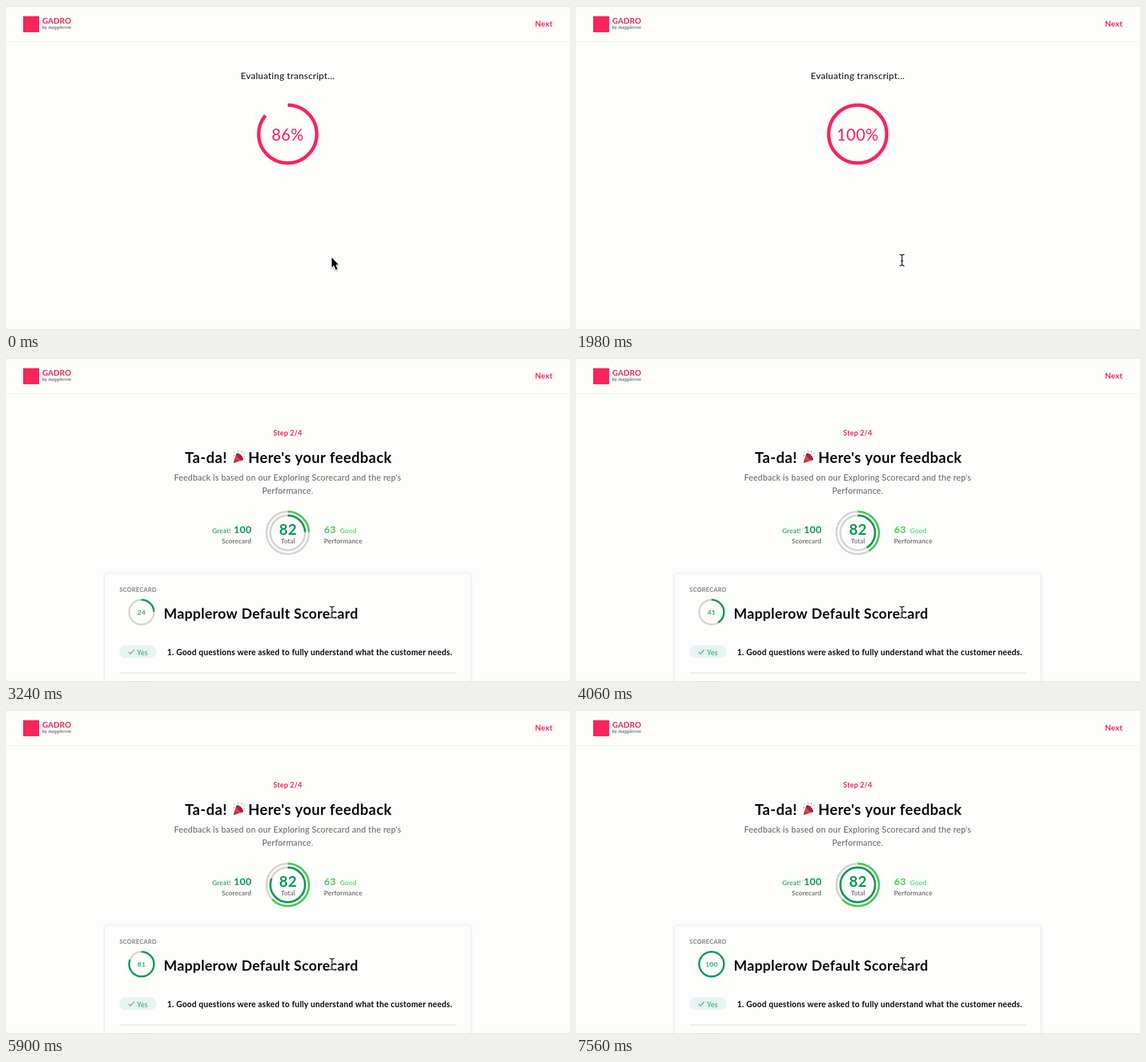
Animation, 987 px wide and 568 px high, one loop 7580 ms. Source, as an HTML page with a canvas:

```html
<!DOCTYPE html>
<html lang="en">
<head>
<meta charset="utf-8">
<title>Call feedback</title>
<style>
  html, body { margin: 0; width: 100%; height: 100%; overflow: hidden; background: #fdfdfc; }
  canvas { display: block; }
</style>
</head>
<body>
<canvas id="stage" width="987" height="568"></canvas>
<script>
const ctx = document.getElementById('stage').getContext('2d');
const W = 987, H = 568, LOOP = 7580;
const LOAD_START = 120, LOAD_END = 1400, BEAM_AT = 1980, RESULT_AT = 2220, NUDGE_AT = 7560;
const PINK = '#f8245a', PINK_TEXT = '#ec2459', GREEN = '#0a9a57', LIME = '#48cb52';
const INK = '#0a0a0a', GREY = '#5c5c5c', TRACK = '#d5d5d5', PAPER = '#fdfdfc';
const TRACKING = 0.02;

// Score shown by the small ring: [time, value]
const SCORE_KEYS = [[RESULT_AT, 2], [3240, 24.3], [4880, 58], [5900, 81], [6860, 100]];

function text(str, x, y, size, color, { weight = 400, align = 'left', family = 'Lato, sans-serif' } = {}) {
  ctx.font = `${weight} ${size}px ${family}`;
  ctx.letterSpacing = `${size * TRACKING}px`;
  ctx.textAlign = align;
  ctx.fillStyle = color;
  ctx.fillText(str, x, y);
}

function rect(x, y, w, h, color) {
  ctx.fillStyle = color;
  ctx.fillRect(x, y, w, h);
}

function ring(x, y, r, width, percent, color) {
  ctx.beginPath();
  ctx.arc(x, y, r, -Math.PI / 2, -Math.PI / 2 + Math.PI * 2 * percent / 100);
  ctx.lineWidth = width;
  ctx.lineCap = 'butt';
  ctx.strokeStyle = color;
  ctx.stroke();
}

function gauge(x, y, r, width, percent, color) {
  ring(x, y, r, width, 100, TRACK);
  ring(x, y, r, width, percent, color);
}

function polygon(points) {
  ctx.beginPath();
  points.forEach(([x, y]) => ctx.lineTo(x, y));
  ctx.closePath();
}

function scoreAt(t) {
  for (let i = 1; i < SCORE_KEYS.length; i++) {
    const [t0, v0] = SCORE_KEYS[i - 1], [t1, v1] = SCORE_KEYS[i];
    if (t < t1) return v0 + (v1 - v0) * (t - t0) / (t1 - t0);
  }
  return 100;
}

function loadAt(t) {
  const u = Math.min(1, Math.max(0, (t - LOAD_START) / (LOAD_END - LOAD_START)));
  return 100 - 13.95 * (1 - u) ** 1.38;
}

function drawFrame() {
  rect(0, 0, W, H, PAPER);
  rect(0, 0, W, 1, '#dcdce8');
  rect(0, 62, W, 1, '#ececec');
  rect(30, 18, 28, 28, PINK);
  text('GADRO', 63.5, 31, 13.7, PINK_TEXT, { weight: 700 });
  text('by mapplerow', 63.5, 40, 7.1, '#3a3a3a', { family: '"Noto Serif", serif' });
  text('Next', 956.5, 36, 13.6, PINK_TEXT, { weight: 700, align: 'right' });
}

function drawLoader(t) {
  const percent = loadAt(t);
  text('Evaluating transcript...', 493, 128, 16.2, INK, { align: 'center' });
  ring(493, 224.5, 50.8, 6, percent, PINK);
  text(Math.round(percent) + '%', 493, 235.5, 28, PINK_TEXT, { align: 'center' });
}

function drawPopper() {
  polygon([[398, 184], [403, 167], [415, 179]]);
  ctx.fillStyle = '#e0404c';
  ctx.fill();
  polygon([[398, 184], [400.5, 175.5], [406.5, 181.5]]);
  ctx.fillStyle = '#c92f4a';
  ctx.fill();
  ctx.beginPath();
  ctx.ellipse(409, 173, 8, 3.6, Math.PI / 4, 0, Math.PI * 2);
  ctx.fillStyle = '#a82440';
  ctx.fill();
  const bits = [
    [400, 165, '#e8b53c'], [406, 163.5, '#5aa9dc'], [412, 164, '#e05b72'],
    [416, 167, '#63b36b'], [417, 173, '#e8b53c'], [411, 169, '#f08a9b'], [399, 171, '#63b36b']
  ];
  for (const [x, y, color] of bits) {
    ctx.beginPath();
    ctx.arc(x, y, 1.1, 0, Math.PI * 2);
    ctx.fillStyle = color;
    ctx.fill();
  }
}

function drawSummary(score) {
  text('Step 2/4', 493, 136, 12.5, PINK_TEXT, { weight: 700, align: 'center' });
  text('Ta-da!', 313, 184, 26, INK, { weight: 700 });
  drawPopper();
  text("Here's your feedback", 424, 184, 25.7, INK, { weight: 700 });
  text("Feedback is based on our Exploring Scorecard and the rep's", 493, 215, 14.7, '#606060', { align: 'center' });
  text('Performance.', 493, 238, 14.7, '#606060', { align: 'center' });

  text('Great!', 361, 307, 11.5, GREEN, { weight: 500 });
  text('100', 430, 307, 17.5, GREEN, { weight: 700, align: 'right' });
  text('Scorecard', 429.5, 325, 11.5, GREY, { weight: 500, align: 'right' });
  text('63', 556.5, 307, 17.5, LIME, { weight: 700 });
  text('Good', 584.5, 307, 11.5, LIME, { weight: 500 });
  text('Performance', 556.5, 325, 11.5, GREY, { weight: 500 });

  gauge(493, 306.5, 37.2, 3.5, Math.min(score, 63), LIME);
  gauge(493, 306.5, 30.4, 3.5, score, GREEN);
  text('82', 493.5, 310, 26, GREEN, { weight: 700, align: 'center' });
  text('Total', 493.5, 325, 11, GREY, { weight: 500, align: 'center' });
}

function drawCard(score) {
  ctx.save();
  ctx.beginPath();
  ctx.roundRect(172.5, 377.5, 641, 220, 4);
  ctx.shadowColor = 'rgba(70, 70, 120, 0.14)';
  ctx.shadowBlur = 5;
  ctx.shadowOffsetY = 1;
  ctx.fillStyle = PAPER;
  ctx.fill();
  ctx.restore();
  ctx.lineWidth = 1;
  ctx.strokeStyle = '#ebebf1';
  ctx.stroke();

  text('SCORECARD', 198.5, 410, 10.6, '#858585', { weight: 700 });
  gauge(237.2, 445.5, 21.7, 3.2, score, GREEN);
  text(Math.floor(score), 237.2, 450.2, 12, GREEN, { weight: 500, align: 'center' });
  text('Mapplerow Default Scorecard', 276, 456.5, 24.6, INK, { weight: 700 });

  ctx.beginPath();
  ctx.roundRect(198.5, 504, 64.5, 22, 11);
  ctx.fillStyle = '#e5f5ef';
  ctx.fill();
  ctx.beginPath();
  ctx.moveTo(214.5, 515.5);
  ctx.lineTo(217.7, 518.7);
  ctx.lineTo(224.3, 511.5);
  ctx.lineWidth = 1.2;
  ctx.strokeStyle = '#2fa774';
  ctx.stroke();
  text('Yes', 229, 520.5, 12.4, '#36a776', { weight: 500 });
  text('1. Good questions were asked to fully understand what the customer needs.',
    282, 521, 14.2, INK, { weight: 700 });
  rect(198.5, 551.5, 589, 1.5, '#e3e3e5');
  rect(207, 567, 49, 1, '#dcdcdc');
}

function drawArrow(x, y) {
  ctx.save();
  ctx.translate(x, y);
  polygon([[0, 0], [0, 17.2], [3.9, 13.7], [7, 21.2], [10, 20], [6.9, 12.7], [11.6, 12.2]]);
  ctx.shadowColor = 'rgba(0, 0, 0, 0.35)';
  ctx.shadowBlur = 3;
  ctx.shadowOffsetY = 1.5;
  ctx.lineWidth = 2;
  ctx.strokeStyle = '#fff';
  ctx.stroke();
  ctx.shadowColor = 'transparent';
  ctx.fillStyle = '#000';
  ctx.fill();
  ctx.restore();
}

function drawBeam(x, y) {
  ctx.save();
  ctx.translate(x, y);
  ctx.beginPath();
  for (const s of [-1, 1]) {
    ctx.moveTo(-4.2, 10 * s);
    ctx.quadraticCurveTo(0, 10 * s, 0, 7 * s);
    ctx.quadraticCurveTo(0, 10 * s, 4.2, 10 * s);
  }
  ctx.moveTo(0, -7.5);
  ctx.lineTo(0, 7.5);
  ctx.moveTo(-2, 1.5);
  ctx.lineTo(2, 1.5);
  for (const [width, color] of [[3.2, '#fff'], [1.5, '#111']]) {
    ctx.lineWidth = width;
    ctx.strokeStyle = color;
    ctx.stroke();
  }
  ctx.restore();
}

function render(now) {
  const t = now % LOOP;
  drawFrame();
  if (t < RESULT_AT) {
    drawLoader(t);
  } else {
    const score = scoreAt(t);
    drawSummary(score);
    drawCard(score);
  }
  rect(0, 567, W, 1, 'rgba(205, 205, 218, 0.75)');
  if (t < BEAM_AT) drawArrow(570, 441);
  else if (t < NUDGE_AT) drawBeam(570.5, 445.5);
  else drawBeam(571.7, 444);
}

const start = performance.now();
function tick() {
  render(performance.now() - start);
  requestAnimationFrame(tick);
}
tick();
</script>
</body>
</html>
```
